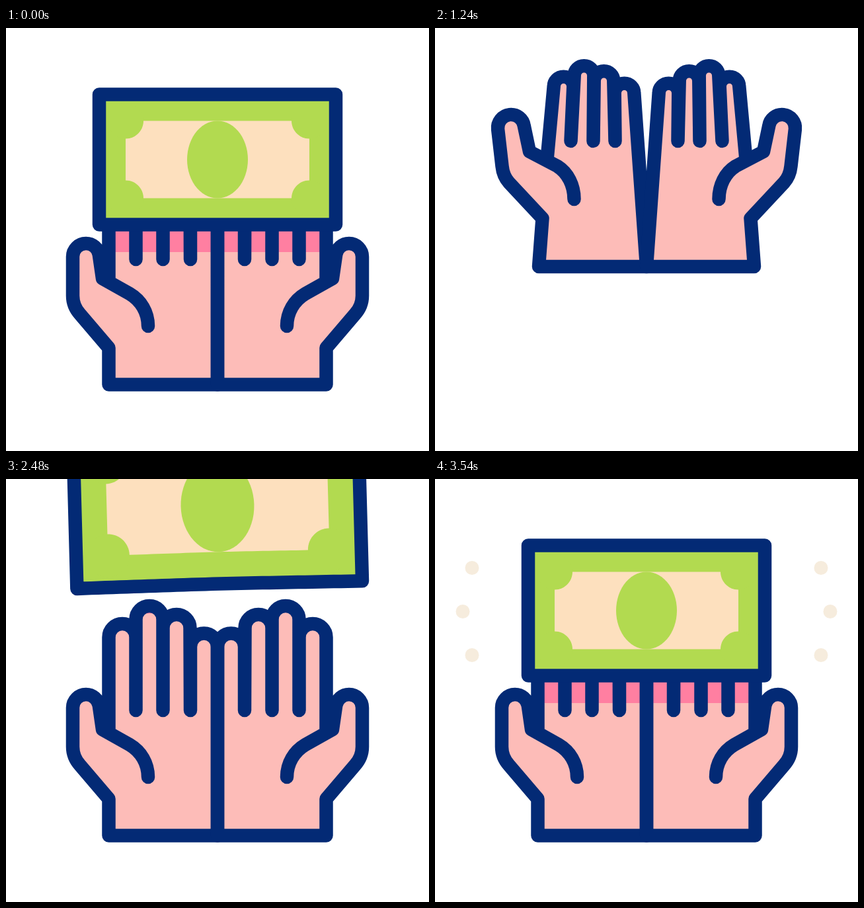
An HTML page with a canvas for the animation above (3600 ms loop, 640 px wide and 640 px high).

```html
<!DOCTYPE html>
<html lang="en">
<head>
<meta charset="utf-8">
<title>Hands and banknote</title>
<style>
  html, body { margin: 0; height: 100%; overflow: hidden; background: #fff; }
  canvas { display: block; width: 100vw; height: 100vh; }
</style>
</head>
<body>
<canvas id="stage" width="640" height="640"></canvas>
<script>
const ctx = document.getElementById('stage').getContext('2d');
const LOOP = 3600;
const NAVY = '#032a75', GREEN = '#b2da50', CREAM = '#fde0be';
const SKIN = '#fdbcb8', SHADE = '#ff7fa1';

const clamp = v => Math.max(0, Math.min(1, v));
const part = (t, from, to) => clamp((t - from) / (to - from));
const ease = (t, from, to) => { const u = part(t, from, to); return u * u * (3 - 2 * u); };
const mix = (a, b, k) => a + (b - a) * k;

// Hands: cupped = 1 is the tilted pose, rise is the lift in pixels
function handState(t) {
  return {
    cupped: ease(t, 0, 400) - ease(t, 1800, 2150),
    rise: 175.5 * (ease(t, 400, 900) - ease(t, 1333, 1800))
  };
}

const RELEASE = 650, TOUCH = 2780;

function billState(t, hand) {
  if (t < 1400) {
    const flight = Math.max(0, t - RELEASE);
    const lift = flight ? 87.75 + flight * 0.527 : hand.rise;
    return {
      y: mix(199, 240.1, hand.cupped) - lift,
      scale: 1 + 0.3 * part(t, RELEASE, 1240),
      squash: hand.cupped * (1 - ease(t, RELEASE, 1000)),
      turn: 0
    };
  }
  const fall = Math.min(t, TOUCH) - 1780;
  const settle = 1 - (1 - part(t, TOUCH, 3220)) ** 2;
  const y = mix(-137 + 0.2283 * fall + 3.72e-5 * fall * fall, 199, settle);
  const height = 199 - y;
  return {
    y,
    scale: 1 + 0.00118 * height + 0.02 * clamp(height / 70),
    squash: 0,
    turn: 9 * ease(t, 1400, 1740) - 21 * ease(t, 1740, 2240)
      + 23.5 * ease(t, 2240, 2760) - 11.5 * ease(t, 2760, 3400)
  };
}

// Each point holds the flat pose (x, y) and the cupped pose (x, y)
const FINGERS = [
  { left: [155.5, 384, 169.5, 199], tip: [176, 239.5, 194.5, 88.5], right: [196.5, 350, 205.5, 171] },
  { left: [196.5, 350, 205.5, 171], tip: [217, 212.5, 225.5, 72], right: [237.5, 350, 239.5, 171] },
  { left: [237.5, 350, 239.5, 171], tip: [258, 225.5, 255.5, 80], right: [279, 350, 272.5, 171] },
  { left: [279, 350, 272.5, 171], tip: [299.5, 254, 286.5, 98.5], right: [320, 539.5, 320, 361] }
];

function handPaths({ cupped, rise }) {
  const at = ([ax, ay, bx, by]) => [mix(ax, bx, cupped), mix(ay, by + 175.5 - rise, cupped)];
  const fill = new Path2D(), line = new Path2D();

  const body = (p, closed) => {
    p.moveTo(...at([320, 539.5, 320, 361]));
    p.lineTo(...at([155.5, 539.5, 157, 361]));
    p.lineTo(...at([155.5, 484, 162.5, 288]));
    p.lineTo(...at([112, 433, 112, 234]));
    p.quadraticCurveTo(...at([101, 421, 103, 224]), ...at([101, 405, 101.5, 209]));
    p.arc(...at([121, 346, 115, 151]), 20, mix(3.14, 3.03, cupped), 6.14);
    p.lineTo(...at([146, 379, 143, 187]));
    if (closed) {
      p.lineTo(...at([155.5, 384, 169.5, 199]));
      p.lineTo(...at([155.5, 330, 175, 150]));
      p.lineTo(...at([320, 330, 304.5, 150]));
      p.closePath();
    } else {
      p.lineTo(...at([187, 402, 185, 209]));
      p.bezierCurveTo(...at([204, 412, 201, 219]), ...at([215, 430, 210.5, 238]),
        ...at([215, 451, 210.5, 259]));
    }
  };
  body(fill, true);
  body(line, false);

  const radius = mix(20.5, 14.8, cupped);
  for (const { left, tip, right } of FINGERS) {
    for (const p of [fill, line]) {
      p.moveTo(...at(left));
      p.arc(...at(tip), radius, Math.PI, 2 * Math.PI);
      p.lineTo(...at(right));
    }
  }
  return { fill, line };
}

function mirrored(draw) {
  for (const side of [1, -1]) {
    ctx.save();
    if (side < 0) flip();
    draw();
    ctx.restore();
  }
}
const flip = () => ctx.transform(-1, 0, 0, 1, 640, 0);

// Bend, squash, scale and turn a point of the banknote
function warp(x, y, bill) {
  const { scale, squash, turn } = bill, a = turn * Math.PI / 180;
  const wx = x * (1 - squash * (0.0565 - 0.0465 * y / 98.5)) * scale;
  const bend = 1.03 * turn * (1 - Math.hypot(x / 179, 0.2));
  const wy = (y * (1 - 0.292 * squash) + bend) * scale;
  return [320 + wx * Math.cos(a) - wy * Math.sin(a), bill.y + wx * Math.sin(a) + wy * Math.cos(a)];
}

function warpedPath(points, bill) {
  const p = new Path2D();
  for (const [x, y] of points) p.lineTo(...warp(x, y, bill));
  p.closePath();
  return p;
}

function box(w, h, dy = 0) {
  const top = [], bottom = [];
  for (let i = -20; i <= 20; i++) {
    top.push([w * i / 20, dy - h]);
    bottom.push([-w * i / 20, dy + h]);
  }
  return top.concat(bottom);
}

function oval(cx, cy, rx, ry) {
  return Array.from({ length: 60 }, (_, i) => {
    const a = i * Math.PI / 30;
    return [cx + rx * Math.cos(a), cy + ry * Math.sin(a)];
  });
}

function drawHands(hand, bill) {
  const { fill, line } = handPaths(hand);
  const shade = warpedPath(box(179, 98.5), { ...bill, y: bill.y + 41.5 });
  mirrored(() => {
    ctx.fillStyle = SKIN;
    ctx.fill(fill);
  });
  for (const side of [1, -1]) {
    ctx.save();
    if (side < 0) flip();
    ctx.clip(fill);
    if (side < 0) flip();
    ctx.fillStyle = SHADE;
    ctx.fill(shade);
    ctx.restore();
  }
  mirrored(() => ctx.stroke(line));
}

function drawBill(bill) {
  const paint = (points, color) => {
    ctx.fillStyle = color;
    ctx.fill(warpedPath(points, bill));
  };
  const dy = -3.5 * bill.squash;
  paint(box(179, 98.5), GREEN);
  paint(box(139, 58.5, dy), CREAM);
  for (const x of [-139, 139])
    for (const y of [-58.5, 58.5]) paint(oval(x, y + dy, 27, 27), GREEN);
  paint(oval(0, dy, 46, 58.5), GREEN);
  ctx.stroke(warpedPath(box(179, 98.5), bill));
}

function drawSparks(t) {
  if (t <= 2600) return;
  const head = ease(t, 2600, 2800), tail = ease(t, 2850, 3400), fade = ease(t, 3100, 3540);
  const color = [[255, 246], [205, 236], [80, 221]].map(([a, b]) => Math.round(mix(a, b, fade)));
  ctx.strokeStyle = `rgb(${color})`;
  ctx.lineWidth = 21;
  mirrored(() => {
    for (const dir of [-1, 0, 1]) {
      const x = dir ? 56 : 42, y0 = 200.5 + dir * 30.5, y1 = 200.5 + dir * 66;
      ctx.beginPath();
      ctx.moveTo(mix(91, x, tail), mix(y0, y1, tail));
      ctx.lineTo(mix(91, x, head) + 0.01, mix(y0, y1, head));
      ctx.stroke();
    }
  });
}

function frame() {
  const t = performance.now() % LOOP;
  const hand = handState(t), bill = billState(t, hand);
  ctx.fillStyle = '#fff';
  ctx.fillRect(0, 0, 640, 640);
  ctx.lineCap = ctx.lineJoin = 'round';
  ctx.lineWidth = 20.5;
  ctx.strokeStyle = NAVY;
  drawHands(hand, bill);
  drawBill(bill);
  drawSparks(t);
  requestAnimationFrame(frame);
}
frame();
</script>
</body>
</html>
```
